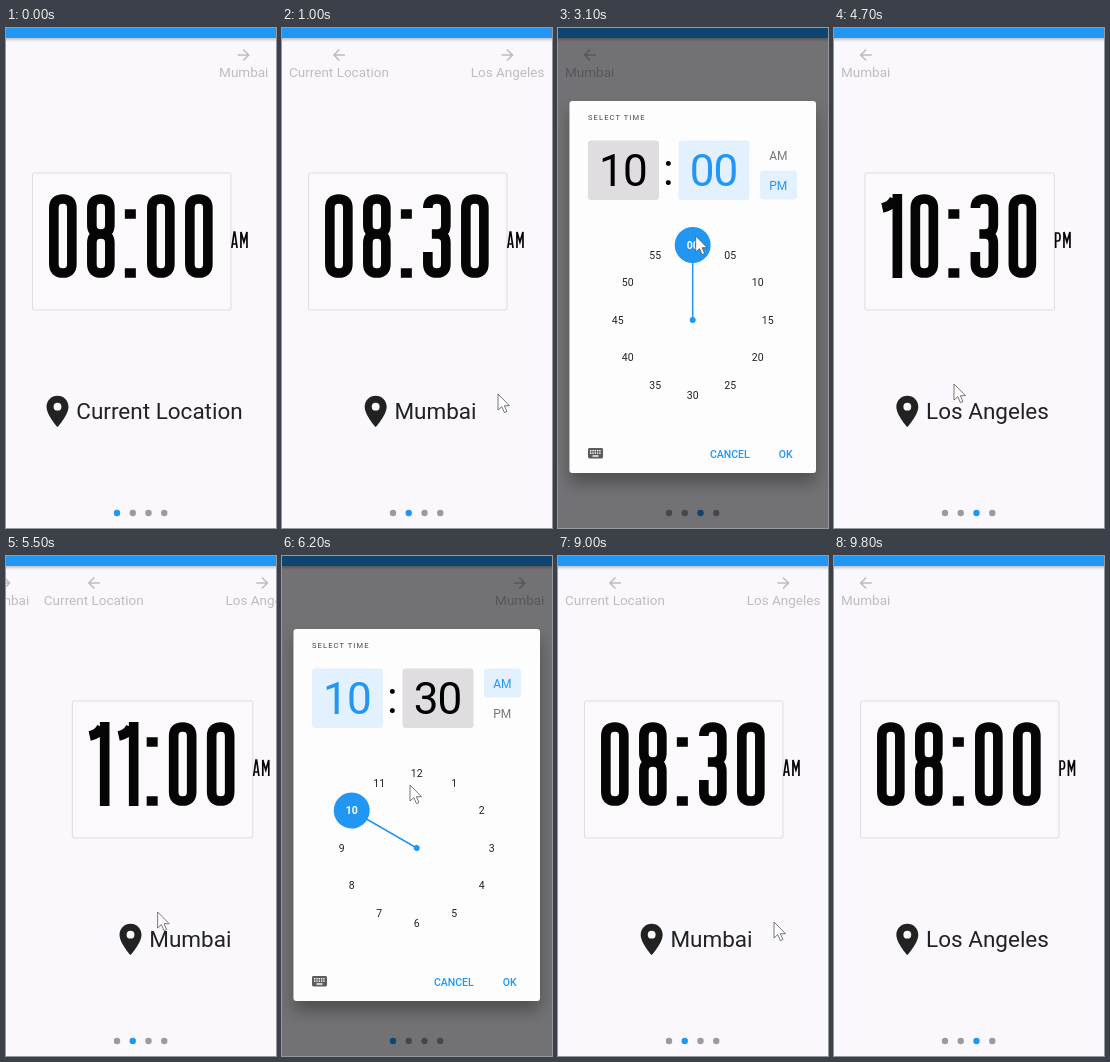
An HTML page for the animation above (10 s loop, 270 by 500 pixels).

```html
<!DOCTYPE html>
<html lang="en">
<head>
<meta charset="utf-8">
<title>World clock</title>
<style>
  html, body { margin: 0; width: 100%; height: 100%; overflow: hidden; background: #faf8fc; }
  svg { display: block; width: 270px; height: 500px; font-family: Roboto, sans-serif; }
  .mid { text-anchor: middle; }
  .digit { fill: none; stroke: #050505; stroke-width: 9.6; }
  .half { fill: none; stroke: #050505; stroke-width: 1.7; }
</style>
</head>
<body>
<svg viewBox="0 0 270 500">
  <defs>
    <linearGradient id="shade" x2="0" y2="1">
      <stop stop-color="#000" stop-opacity=".22"/>
      <stop offset="1" stop-color="#000" stop-opacity="0"/>
    </linearGradient>
    <filter id="lift" x="-20%" y="-20%" width="140%" height="140%">
      <feDropShadow dx="0" dy="10" stdDeviation="8" flood-opacity=".3"/>
    </filter>
  </defs>
  <rect width="270" height="500" fill="#faf8fc"/>
  <g id="pages"></g>
  <g id="dots"></g>
  <rect y="10" width="270" height="4" fill="url(#shade)"/>
  <rect width="270" height="10" fill="#2196f3"/>
  <rect id="scrim" width="270" height="500"/>
  <g id="dialog">
    <rect x="11.5" y="73" width="246.5" height="372" rx="3" fill="#fefdfe" filter="url(#lift)"/>
    <text x="30" y="92" font-size="7.5" letter-spacing="1.13" fill="#444">SELECT TIME</text>
    <rect id="hourBox" x="30" y="112.5" width="71" height="59.5" rx="3"/>
    <rect id="minBox" x="120.5" y="112.5" width="71" height="59.5" rx="3"/>
    <g class="mid" font-size="44" letter-spacing="-.8">
      <text id="hour" x="65" y="157.5"></text>
      <text x="110" y="157">:</text>
      <text id="min" x="155.6" y="157.5"></text>
    </g>
    <rect id="halfBox" x="202" width="37" height="29" rx="3" fill="#e2f1fd"/>
    <g class="mid" font-size="12">
      <text id="am" x="220.3" y="131.5">AM</text>
      <text id="pm" x="220.3" y="161.5">PM</text>
    </g>
    <g id="hand" fill="#2196f3">
      <path d="M134.7 292V217" stroke="#2196f3" stroke-width="1.5"/>
      <circle cx="134.7" cy="292" r="3"/>
      <circle cx="134.7" cy="217" r="18"/>
    </g>
    <g id="hours" class="mid" font-size="10.5"></g>
    <g id="minutes" class="mid" font-size="10.5"></g>
    <g id="keyboard"></g>
    <g class="mid" font-size="10.5" font-weight="500" fill="#2196f3">
      <text x="171.8" y="429.5">CANCEL</text>
      <text x="227.7" y="429.5">OK</text>
    </g>
  </g>
  <path id="cursor" d="M0 0V16L3.8 12.6 6.4 18.6 8.9 17.5 6.4 11.7H11.5Z" fill="#fff" stroke="#555" stroke-width=".8"/>
</svg>
<script>
const LOOP = 10000, BLUE = '#2196f3', TINT = '#e2f1fd', GREY = '#dfdde0';
const $ = id => document.getElementById(id);
const set = (node, attrs) => { for (const k in attrs) node.setAttribute(k, attrs[k]); };
function add(parent, tag, attrs, text) {
  const node = document.createElementNS('http://www.w3.org/2000/svg', tag);
  set(node, attrs);
  if (text !== undefined) node.textContent = text;
  return parent.appendChild(node);
}
const pad = n => String(n).padStart(2, '0');
const smooth = u => u * u * (3 - 2 * u);
const ramp = (t, start, length) => smooth(Math.min(1, Math.max(0, (t - start) / length)));

// Condensed lettering, built from open and closed bowls.
const arch = (top, bottom) => `M5 ${top + 9}Q5 ${top} 14 ${top}T23 ${top + 9}V${bottom - 9}Q23 ${bottom} 14 ${bottom}`;
const bowl = (top, bottom) => arch(top, bottom) + `T5 ${bottom - 9}Z`;
const DIGITS = {
  0: bowl(5, 79),
  1: 'M16 84V0M13 5Q10 12 1 14',
  3: arch(5, 40) + 'H9' + arch(40, 79).replace(/^.*?Q.*?T/, 'M14 40Q23 40 ') + 'T5 70V58',
  8: bowl(5, 40) + bowl(40, 79),
  ':': 'M0 20H11M0 79H11'
};
const HALVES = {
  AM: 'M.9 16L3.2 0H3.8L6.1 16M1.6 12H5.4M10 16V0L13 10 16 0V16',
  PM: 'M1.2 16V1H3.5Q5.6 1 5.6 5T3.5 9H1.2M9.5 16V0L12.5 10 15.5 0V16'
};
const PIN = 'M12 2C8.1 2 5 5.1 5 9c0 5.3 7 13 7 13s7-7.7 7-13c0-3.9-3.1-7-7-7zm0 9.5a2.5 2.5 0 1 1 0-5 2.5 2.5 0 0 1 0 5z';
const ARROW = 'M12 4l-1.4 1.4L16.2 11H4v2h12.2l-5.6 5.6L12 20l8-8z';

const PAGES = [
  { name: 'Current Location', half: 'AM', times: ['08:00', '10:30'] },
  { name: 'Mumbai', half: 'AM', times: ['08:30', '11:00'] },
  { name: 'Los Angeles', half: 'PM', times: ['08:00', '10:30'] }
];

function addLink(parent, name, side) {
  const g = add(parent, 'g', { fill: '#bebcc0' });
  const label = add(g, 'text', { y: 48.5, class: 'mid', 'font-size': 13.5 }, name);
  const x = 134.7 + side * (127.7 - label.getComputedTextLength() / 2);
  set(label, { x });
  add(g, 'path', { d: ARROW, transform: `translate(${x} 27) scale(${side * .76} .76) translate(-12 -12)` });
}

function addClock(parent, time, half) {
  const g = add(parent, 'g', { 'aria-label': time + ' ' + half });
  const step = c => c === '1' ? 29 : c === ':' ? 22 : 38;
  const width = [...time].reduce((sum, c) => sum + step(c), 24.5);
  const left = 134.7 - (width + 18) / 2;
  add(g, 'rect', { x: left, y: 145, width, height: 137, rx: 2, fill: '#fbf9fc', stroke: '#dedce1' });
  let x = left + 16.4;
  for (const c of time) {
    add(g, 'path', { class: 'digit', d: DIGITS[c], transform: `translate(${x} 166)` });
    x += step(c);
  }
  add(g, 'path', { class: 'half', d: HALVES[half], transform: `translate(${left + width} 204)` });
  return g;
}

function addPlace(parent, name) {
  const label = add(parent, 'text', { y: 391, 'font-size': 22.5, fill: '#222' }, name);
  const x = 134.7 + (37.6 - label.getComputedTextLength()) / 2;
  set(label, { x });
  add(parent, 'path', { d: PIN, fill: '#222', transform: `translate(${x - 37.6} 364.5) scale(1.57)` });
}

PAGES.forEach((p, i) => {
  p.node = add($('pages'), 'g', {});
  if (PAGES[i - 1]) addLink(p.node, PAGES[i - 1].name, -1);
  if (PAGES[i + 1]) addLink(p.node, PAGES[i + 1].name, 1);
  p.clocks = p.times.map(time => addClock(p.node, time, p.half));
  addPlace(p.node, p.name);
});

const dots = [0, 1, 2, 3].map(i => add($('dots'), 'circle', { cx: 111 + i * 15.75, cy: 485, r: 3.2 }));

function dialPoint(hour, dx, dy) {
  const a = hour * Math.PI / 6;
  return [134.7 + 75 * Math.sin(a) + dx, 292 - 75 * Math.cos(a) + dy];
}
function addDial(parent, label) {
  return Array.from({ length: 12 }, (_, i) => {
    const [x, y] = dialPoint(i, 0, 3.8);
    return add(parent, 'text', { x, y }, label(i));
  });
}
const dials = [addDial($('hours'), i => i || 12), addDial($('minutes'), i => pad(i * 5))];

add($('keyboard'), 'rect', { x: 30, y: 420, width: 15, height: 10.5, rx: 1.4, fill: '#5c5c5e' });
for (let i = 0; i < 10; i++) {
  add($('keyboard'), 'rect', { x: 32 + i % 5 * 2.3, y: 422 + (i > 4) * 2.4, width: 1.4, height: 1.4, fill: '#fff' });
}
add($('keyboard'), 'rect', { x: 34.5, y: 427.3, width: 6, height: 1.4, fill: '#fff' });

// Swipes turn one page; edits walk the hand through hour, new hour, minute, new minute.
const SWIPE = 480;
const SWIPES = [500, 1050, 4850, 5400, 8200, 9050].map((start, i) => ({ start, dir: i >> 1 === 1 ? -1 : 1 }));
const EDITS = [{ start: 2250, pose: [8, 10, 12, 18] }, { start: 6000, pose: [10, 8, 6, 0] }];
const PICK = 450, SWITCH = 680, DRAG = 900, DRAG_TIME = 550, CLOSE = 1810;

function handAt({ pose: [a, b, c, d] }, s) {
  return a + (b - a) * ramp(s, PICK, 200) + (c - b) * ramp(s, SWITCH, 120) + (d - c) * ramp(s, DRAG, DRAG_TIME);
}

// The pointer rests before each gesture and follows it.
const stops = [];
for (const { start, dir } of SWIPES) {
  const [x, y] = dir > 0 ? [216, 366] : [120, 356];
  stops.push([start - 150, x, y], [start, x, y], [start + 300, x - dir * 120, y]);
}
for (const edit of EDITS) {
  const { start } = edit;
  stops.push([start - 250, 138, 204], [start, 138, 204], [start + 200, 128, 229]);
  for (let s = PICK; s <= DRAG + DRAG_TIME; s += 50) stops.push([start + s, ...dialPoint(handAt(edit, s), 3, -9)]);
  stops.push([start + CLOSE - 100, 226, 426], [start + CLOSE, 226, 426]);
}
stops.sort((a, b) => a[0] - b[0]);

function pointer(t) {
  const i = Math.max(1, stops.findIndex(s => s[0] > t));
  const [from, x, y] = stops[i - 1], [to, x2, y2] = stops[i];
  const u = ramp(t, from, to - from);
  return [x + (x2 - x) * u, y + (y2 - y) * u];
}

function drawPages(t) {
  const page = SWIPES.reduce((sum, { start, dir }) => sum + dir * ramp(t, start, SWIPE), 0);
  const [first, second] = EDITS.map(e => e.start + CLOSE);
  const shown = t >= first && t < second ? 1 : 0;
  PAGES.forEach((p, i) => {
    set(p.node, { transform: `translate(${(i - page) * 270} 0)` });
    p.clocks.forEach((c, k) => set(c, { display: k === shown ? 'inline' : 'none' }));
  });
  dots.forEach((d, i) => set(d, { fill: i === Math.round(page) ? BLUE : '#9c9a9f' }));
}

function drawDialog(t) {
  const edit = EDITS[t < 5000 ? 0 : 1], s = t - edit.start, hand = handAt(edit, s);
  const show = ramp(s, 0, 130) - ramp(s, CLOSE, 90);
  const dial = ramp(s, SWITCH, 100), byMinute = dial > .5, pm = edit === EDITS[0];
  const minute = s < DRAG ? edit.pose[2] : hand;
  set($('scrim'), { opacity: .54 * show });
  set($('dialog'), { opacity: show, display: show ? 'inline' : 'none' });

  set($('hourBox'), { fill: byMinute ? GREY : TINT });
  set($('minBox'), { fill: byMinute ? TINT : GREY });
  set($('hour'), { fill: byMinute ? '#000' : BLUE });
  set($('min'), { fill: byMinute ? BLUE : '#000' });
  $('hour').textContent = edit.pose[s < PICK + 100 ? 0 : 1];
  $('min').textContent = pad(Math.round(minute * 5) % 60);
  set($('halfBox'), { y: pm ? 142.5 : 112.5 });
  set($('am'), { fill: pm ? '#757575' : BLUE });
  set($('pm'), { fill: pm ? BLUE : '#757575' });

  set($('hand'), { transform: `rotate(${hand * 30} 134.7 292)` });
  set($('hours'), { opacity: 1 - dial });
  set($('minutes'), { opacity: dial });
  for (const labels of dials) labels.forEach((label, i) => {
    const covered = Math.abs((hand - i + 18) % 12 - 6) < .4;
    set(label, { fill: covered ? '#fff' : '#222', 'font-weight': covered ? 700 : 400 });
  });
}

function draw(t) {
  drawPages(t);
  drawDialog(t);
  const visible = t >= 500 && t < 9700;
  set($('cursor'), {
    transform: `translate(${visible ? pointer(Math.min(t, stops[stops.length - 1][0] - 1)) : [0, 0]})`,
    display: visible ? 'inline' : 'none'
  });
}

const start = performance.now();
function tick() {
  draw((performance.now() - start) % LOOP);
  requestAnimationFrame(tick);
}
tick();
</script>
</body>
</html>
```
